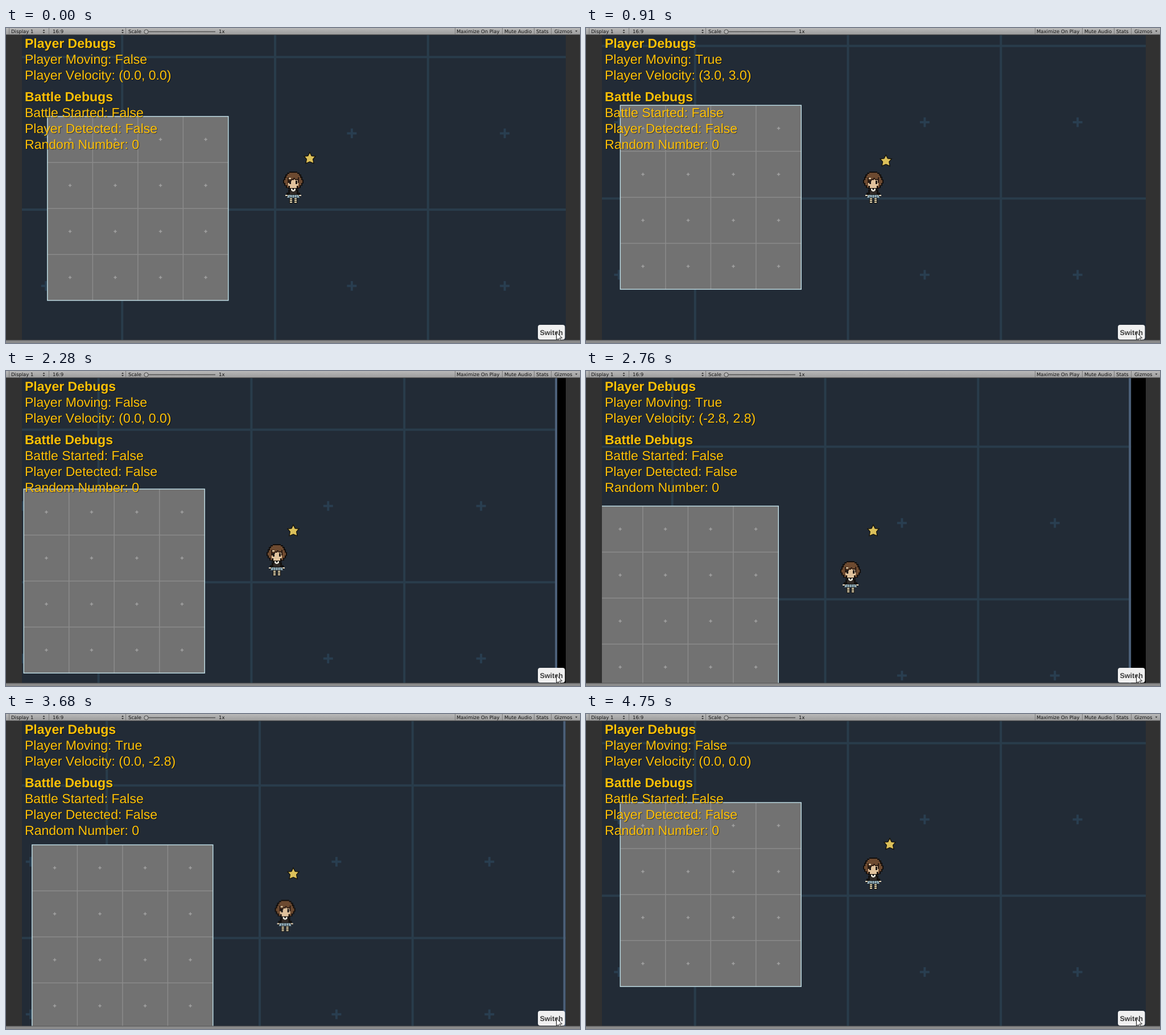
An HTML page that plays this animation: 1009x555 px, repeating every 6310 ms.

```html
<!DOCTYPE html>
<html lang="en">
<head>
<meta charset="utf-8">
<title>Player and star debug view</title>
<style>
  html, body { margin: 0; width: 100%; height: 100%; overflow: hidden; background: #313131; }
  svg { display: block; width: 1009px; height: 555px; }
  text { white-space: pre; text-rendering: geometricPrecision; }
  .hud { font: 23.05px "Liberation Sans", Arial, sans-serif; fill: #ffc107; font-kerning: none;
         text-shadow: 1px 1px 1px rgba(0, 0, 0, .5); }
  .hud .head { font-weight: bold; }
  .bar { font: 8.5px "DejaVu Sans", sans-serif; fill: #111; }
  .label { font: bold 12.6px "Liberation Sans", Arial, sans-serif; fill: #3a3a3a; text-anchor: middle; }
</style>
</head>
<body>
<svg viewBox="0 0 1009 555">
  <defs>
    <clipPath id="view"><rect x="28" y="12" width="956" height="538"/></clipPath>
    <linearGradient id="chrome" x2="0" y2="1">
      <stop offset="0" stop-color="#b8b8b8"/><stop offset="1" stop-color="#9c9c9c"/>
    </linearGradient>
  </defs>
  <rect width="1009" height="555" fill="#313131"/>
  <g clip-path="url(#view)">
    <rect x="28" y="12" width="956" height="538" fill="#000"/>
    <g id="world"></g>
    <g id="player">
      <path d="M-7-28H7V-26H11V-23H14V-19H16V-14H18V-7H16V-3H13V1H9V3H-9V1H-13V-3H-16V-7H-18V-14H-16V-19H-14V-23H-11V-26H-7Z" fill="#120e0c"/>
      <path d="M-7-26H7V-24H10V-21H12V-17H14V-13H16V-8H14V-4H11V0H8V-10H-8V0H-11V-4H-14V-8H-16V-13H-14V-17H-12V-21H-10V-24H-7Z" fill="#6d4a30"/>
      <path d="M-9-14H9V-3H6V1H-6V-3H-9Z" fill="#e0c29c"/>
      <path d="M-10-18H10V-8H8V-13H3V-15H1V-13H-3V-11H-6V-8H-10Z" fill="#2b1b13"/>
      <path d="M-8-20H8V-15H3V-17H0V-15H-4V-13H-8Z" fill="#6d4a30"/>
      <path d="M-8-17h4v2h-4z" fill="#e6d6b4"/>
      <path d="M-7-12h3v6h-3zM4-12h3v6h-3z" fill="#1b1716"/>
      <path d="M-6 2H6V4H9V9H12V17H-12V9H-9V4H-6Z" fill="#12100e"/>
      <path d="M-6 6h12v6h-12z" fill="#302a26"/>
      <path d="M-4 2h2l2 3 2-3h2v3l-3 2h-2l-3-2z" fill="#e9e6da"/>
      <path d="M-14 13h4v2h-4zM10 13h4v2h-4z" fill="#ead8bb"/>
      <path d="M-9 13h18l2 5h-22z" fill="#8fa9b4"/>
      <path d="M-6 14v4M-2 13v5M2 13v5M6 14v4" stroke="#33434b"/>
      <path d="M-7 18h6v10h-6zM1 18h6v10h-6z" fill="#15130f"/>
      <path d="M-6 19h4v2h-4zm0 3h4v2h-4zm0 3h4v2h-4zM2 19h4v2h-4zm0 3h4v2h-4zm0 3h4v2h-4z" fill="#e3d5b0"/>
    </g>
    <path id="star" d="M0-10 3.2-3.6 10-3 5.6 2.2 7 9.5 0 6.6-7 9.500-5.600 2.200-10-3-3.200-3.600Z"
      fill="#dcc05a" stroke="#15120a" stroke-width="1.3"/>
    <g id="hud" class="hud"></g>
    <rect x="935" y="523" width="47.500" height="26" rx="4" fill="#f0f0f0"/>
    <text class="label" x="958.7" y="541">Switch</text>
    <path d="M967.5 536v14l3.2-3 2.3 5.2 2.3-1-2.3-5h4.5z" fill="#fff" stroke="#111"/>
  </g>
  <rect width="1009" height="12" fill="url(#chrome)"/>
  <rect y="11.5" width="1009" height="1" fill="#3c3c3c"/>
  <rect y="550" width="1009" height="5" fill="#8b8b8b"/>
  <rect y="549.5" width="1009" height="1" fill="#555"/>
  <g id="bar" class="bar">
    <path d="M249 6.5h119" stroke="#555" stroke-width="1.3"/>
    <circle cx="246.5" cy="6.5" r="3.6" fill="#b5b5b5" stroke="#444"/>
    <path d="M64.5 5l2-2.5 2 2.5zm0 2l2 2.5 2-2.5zM203 5l2-2.5 2 2.5zm0 2l2 2.5 2-2.5zM1000.5 4.5h4l-2 2.5z" fill="#333"/>
    <path d="M5.5 0v11M75.5 0v11M210.5 0v11M789.5 0v11M872.5 0v11M928.5 0v11M958.5 0v11" stroke="#7c7c7c"/>
  </g>
</svg>
<script>
const LOOP = 6310, TAU = 58, DT = 10;
const CENTER = [505, 281], START = [32, -39], OFFSET = [29, -52];
const TO_STAR = 2280, TO_PLAYER = 4370;

// Held keys per axis: [from, to, direction], y pointing down
const WALK = {
  speed: .161,
  keys: [
    [[225, 405, 1], [470, 672, -1], [810, 960, 1], [1020, 1250, -1], [1300, 1480, 1]],
    [[330, 400, -1], [540, 801, 1], [840, 1030, -1], [1110, 1329, 1], [1400, 1621, -1]]
  ]
};
const FLY = {
  speed: .15,
  keys: [
    [[2525, 2640, 1], [2718, 2930, -1], [3150, 3360, 1], [3430, 3640, -1], [3720, 3847, 1]],
    [[2560, 2840, -1], [2920, 3100, 1], [3240, 3440, -1], [3530, 3740, 1], [3750, 3953, -1]]
  ]
};
// Screen refresh: [from, interval]
const TICKS = [[0, 230], [230, 75.5], [1440, 80], [2280, 250], [2530, 76.5], [4370, 76]];

const $ = id => document.getElementById(id);
function add(parent, tag, attrs, text) {
  const el = document.createElementNS("http://www.w3.org/2000/svg", tag);
  for (const k in attrs) el.setAttribute(k, attrs[k]);
  if (text) el.textContent = text;
  return parent.appendChild(el);
}
const box = (x, y, width, height, fill) => add($("world"), "rect", { x, y, width, height, fill });
function plus(x, y, size, w, fill) {
  box(x - size / 2, y - w / 2, size, w, fill);
  box(x - w / 2, y - size / 2, w, size, fill);
}

function buildWorld() {
  const cell = 268.8, edge = 2 * cell;
  box(-1200, -1200, 1200 + edge, 2400, "#222b36");
  for (let i = -4; i < 4; i++) {
    if (i < 2) box(i * cell - 2, -1200, 4, 2400, "#293c4b");
    box(-1200, i * cell - 2, 1200 + edge, 4, "#293c4b");
  }
  for (let i = -4; i < 2; i++)
    for (let j = -4; j < 4; j++) plus((i + .5) * cell + .5, (j + .5) * cell, 17, 4, "#293e50");
  box(edge - 4, -1200, 4, 2400, "#4c6079");

  const x = -400.2, y = -164.2, w = 318, h = 324.2;
  box(x, y, w, h, "#727272");
  for (let i = 1; i < 4; i++) {
    box(x + i * w / 4 - .7, y, 1.5, h, "#8b8b8b");
    box(x, y + i * h / 4 - .7, w, 1.5, "#8b8b8b");
  }
  for (let i = 0; i < 4; i++)
    for (let j = 0; j < 4; j++) plus(x + (i + .5) * w / 4, y + (j + .5) * h / 4, 5.5, 1.5, "#a2a2a2");
  add($("world"), "rect", { x, y, width: w, height: h, fill: "none", stroke: "#c3e2ea", "stroke-width": 1.4 });
}

const moved = (m, axis, t) => m.speed * m.keys[axis].reduce(
  (sum, [a, b, dir]) => sum + dir * Math.max(0, Math.min(t, b) - a), 0);
const held = (m, axis, t) => (m.keys[axis].find(([a, b]) => t >= a && t < b) || [0, 0, 0])[2];
const playerAt = t => START.map((s, i) => s + moved(WALK, i, t));
const flying = t => t >= TO_STAR && t < TO_PLAYER;

// The star eases toward its place beside the player unless it is being steered
function buildTrail() {
  const trail = [], ease = 1 - Math.exp(-DT / TAU);
  let star = START.map((s, i) => s + OFFSET[i]);
  for (let t = 0; t <= LOOP; t += DT) {
    const p = playerAt(t);
    star = star.map((s, i) => {
      const home = p[i] + OFFSET[i];
      return flying(t) ? home + moved(FLY, i, t) : s + (home - s) * ease;
    });
    trail.push(star);
  }
  return trail;
}

buildWorld();
const trail = buildTrail();
const lines = ["Player Debugs", "", "", "Battle Debugs", "Battle Started: False", "Player Detected: False", "Random Number: 0"]
  .map((s, i) => add($("hud"), "text",
    { x: 33, y: 34.6 + i * 28 + (i > 2 ? 10 : 0), class: i % 3 || i > 3 ? "" : "head" }, s));
[[9, "Display 1"], [82, "16:9"], [215, "Scale"], [374, "1x"], [792, "Maximize On Play"],
 [876, "Mute Audio"], [932, "Stats"], [964, "Gizmos"]]
  .forEach(([x, s]) => add($("bar"), "text", { x, y: 8.9 }, s));

function place(id, [x, y]) {
  $(id).setAttribute("transform", `translate(${x.toFixed(1)} ${y.toFixed(1)})`);
}

function draw(now) {
  const time = now % LOOP;
  const [from, step] = TICKS.filter(k => time >= k[0]).pop();
  const t = from + Math.floor((time - from) / step) * step;

  const player = playerAt(t), star = trail[Math.round(t / DT)];
  const cam = flying(t) ? star : player;
  const origin = CENTER.map((c, i) => c - cam[i]);
  const toScreen = p => p.map((v, i) => v + origin[i]);
  place("world", origin);
  place("player", toScreen(player));
  place("star", toScreen(star));

  const mover = flying(t) ? FLY : WALK, speed = flying(t) ? 2.8 : 3;
  const vx = held(mover, 0, t) * speed, vy = (0 - held(mover, 1, t)) * speed;
  lines[1].textContent = "Player Moving: " + (vx || vy ? "True" : "False");
  lines[2].textContent = `Player Velocity: (${vx.toFixed(1)}, ${vy.toFixed(1)})`;
}

const begin = performance.now();
function loop() {
  draw(performance.now() - begin);
  requestAnimationFrame(loop);
}
loop();
</script>
</body>
</html>
```
